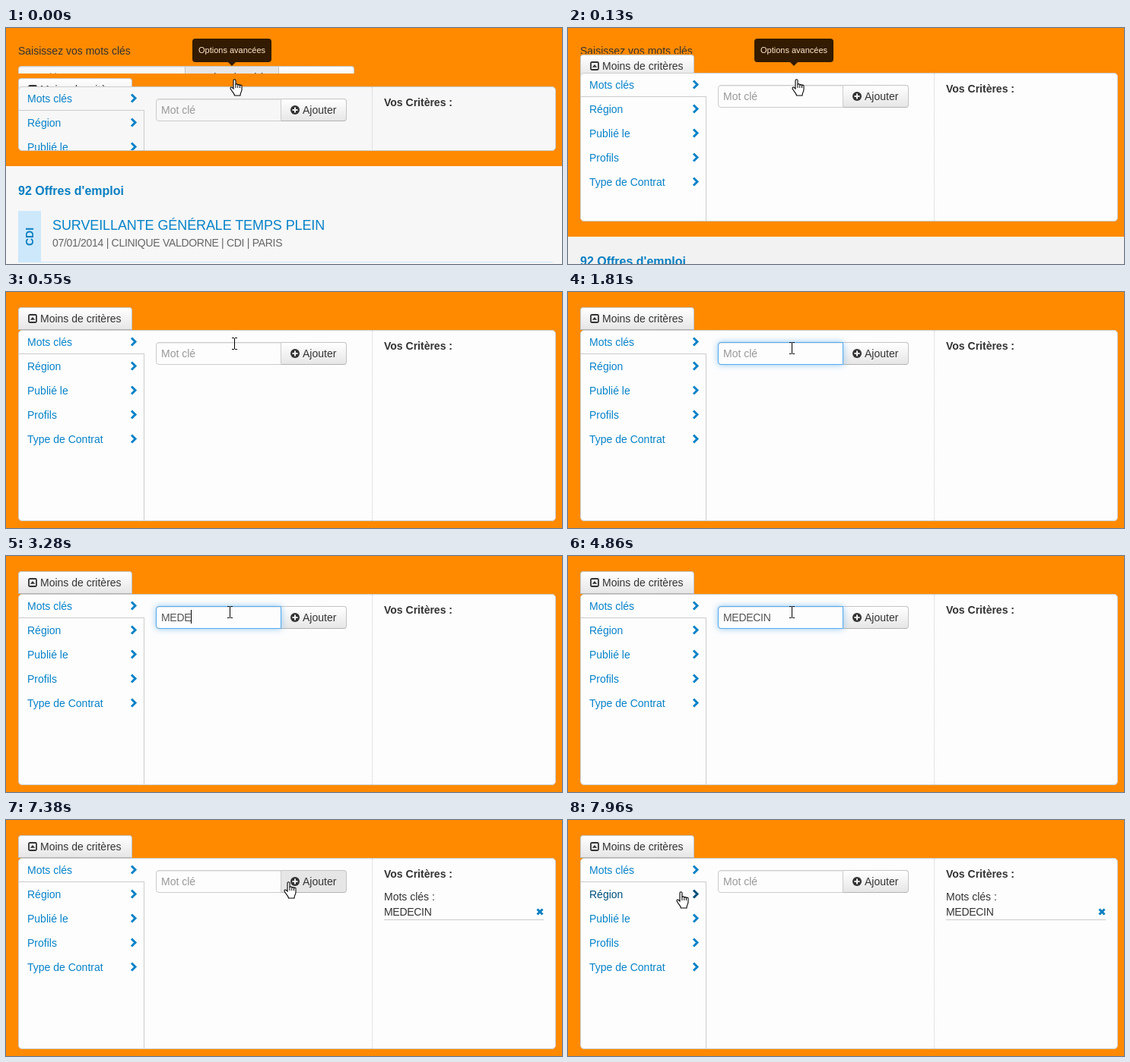
Animation, 731 px wide and 311 px high, one loop 8 s. Source, as an HTML page:

```html
<!DOCTYPE html>
<html lang="fr">
<head>
<meta charset="utf-8">
<title>Recherche d'offres</title>
<style>
  html, body { margin: 0; width: 100%; height: 100%; overflow: hidden; }
  body { position: relative; background: #ff8a00; color: #333; white-space: nowrap;
    font: 14px/20px "Liberation Sans", Arial, sans-serif; }
  body *, body *::before { box-sizing: border-box; }
  body div, #cursor { position: absolute; }
  svg { overflow: visible; }
  .icon { width: 12px; height: 12px; fill: currentColor; vertical-align: -1px; margin-right: 4px; }
  .caps { letter-spacing: -.3px; }
  .btn { height: 30px; padding: 4px 12px; border: 1px solid #c4c4c4; border-bottom-color: #b3b3b3;
    background: linear-gradient(#fff, #e6e6e6); }
  .btn.hover { background: #e6e6e6; }
  .btn.pressed { background: #e0e0e0; box-shadow: inset 0 2px 4px #0002; }
  .input { height: 30px; padding: 4px 6px; border: 1px solid #ccc; border-radius: 4px 0 0 4px;
    background: var(--paper); color: #999; box-shadow: inset 0 1px 1px #00000013; }

  #search { left: 0; top: 0; width: 731px; overflow: hidden; }
  #less { left: 16px; width: 150px; border-radius: 4px 4px 0 0; }
  #panel { left: 16px; width: 707px; overflow: hidden; border: 1px solid #ccc; border-radius: 5px;
    background: var(--paper); }
  #nav div { left: 11px; width: 145px; color: #0782c8; }
  #nav div.hover { color: #00507c; }
  #nav svg { position: absolute; right: 0; top: 3px; width: 10px; height: 13px; fill: none;
    stroke: currentColor; stroke-width: 3; }
  #tab { left: 0; top: 30px; width: 165px; height: 1px; background: #ccc; }
  #side { left: 164px; top: 31px; width: 1px; height: 230px; background: #ccc; }
  #dots { left: 464px; top: 0; height: 252px; border-left: 1px dotted #ccc; }
  #field { left: 180px; top: 15px; width: 165px; }
  #field.typed { color: #555; }
  #glow { left: 180px; top: 15px; width: 165px; height: 30px; border: 1px solid #52a8ec;
    border-radius: 4px 0 0 4px; box-shadow: 0 0 8px #52a8ec99; }
  #caret { display: inline-block; width: 1px; height: 18px; margin-right: -1px; vertical-align: top;
    background: #000; }
  #add { left: 344px; top: 15px; width: 87px; border-radius: 0 4px 4px 0; }
  #criterion { left: 480px; top: 40px; width: 210px; height: 41px; border-bottom: 1px solid #ccc; }
  #criterion svg { position: absolute; right: 0; top: 25px; width: 10px; height: 10px;
    stroke: #0a7fc1; stroke-width: 3; }
  #page { left: 0; width: 731px; height: 311px; background: var(--page); }
  #badge { left: 16px; top: 59px; width: 30px; height: 67px; background: #cde8fb; color: #0a7fc1;
    font-weight: bold; writing-mode: vertical-rl; transform: rotate(180deg); text-align: center; line-height: 30px; }
  #tip { left: 245px; top: 14px; width: 104px; height: 31px; border-radius: 4px; background: #000;
    color: #fff; font-size: 11px; line-height: 31px; text-align: center; }
  #tip::before { content: ""; position: absolute; left: 47px; top: 31px; border: 5px solid transparent;
    border-top-color: #000; border-bottom: 0; }
  #cursor { width: 17px; height: 23px; left: 0; top: 0; }
</style>
</head>
<body>
<svg width="0" height="0" style="position:absolute">
  <symbol id="square" viewBox="0 0 12 12">
    <rect x="1" y="1" width="10" height="10" rx="1.5" fill="none" stroke="currentColor" stroke-width="1.8"/>
    <path d="M2.8 7.8 6 4l3.2 3.8z"/>
  </symbol>
  <symbol id="plus" viewBox="0 0 12 12">
    <circle cx="6" cy="6" r="6"/><path d="M6 2.5v7M2.5 6h7" stroke="#f3f3f3" stroke-width="2"/>
  </symbol>
  <symbol id="chevron" viewBox="0 0 10 13"><path d="M2 1.5 7 6.5 2 11.5"/></symbol>
  <symbol id="hand" overflow="visible">
    <path fill="#fff" stroke="#000" stroke-width="1.1" d="M5 13V2.2a1.5 1.5 0 0 1 3 0V8a1.4 1.4 0 0 1 2.8.5 1.4 1.4 0 0 1 2.7.6 1.3 1.3 0 0 1 2.5.8V14c0 3-2 4-2 8H6.5c0-3-3.5-5-5.3-9-.8-2 1.5-2.8 2.6-1z"/>
    <path fill="none" stroke="#000" d="M8 7.5V12M10.8 8.5V12M13.5 9V12"/>
  </symbol>
  <symbol id="beam" overflow="visible">
    <path fill="none" stroke="#000" d="M0 .5h3m1 0h3M3.5 1v14M0 15.5h3m1 0h3"/>
  </symbol>
</svg>

<div id="page">
  <div style="left:16px;top:23px;font-weight:bold;font-size:16px;color:#0a7fc1">92 Offres d'emploi</div>
  <div style="left:16px;top:126px;width:703px;height:1px;background:#cde6f8"></div>
  <div id="badge">CDI</div>
  <div style="left:61px;top:68px;font-size:18px;color:#0782c8;letter-spacing:-.1px">SURVEILLANTE GÉNÉRALE TEMPS PLEIN</div>
  <div class="caps" style="left:61px;top:91px;color:#666">07/01/2014 | CLINIQUE VALDORNE | CDI | PARIS</div>
</div>

<div id="search">
  <div style="left:16px;top:20px">Saisissez vos mots clés</div>
  <div class="input" style="left:16px;top:50px;width:220px">Mot clé</div>
  <div class="btn hover" style="left:235px;top:50px;width:124px"><svg class="icon"></svg>Plus de critères</div>
  <div class="btn" style="left:358px;top:50px;width:100px;border-radius:0 4px 4px 0"></div>
</div>

<div id="less" class="btn"><svg class="icon"><use href="#square"/></svg>Moins de critères</div>

<div id="panel">
  <div id="nav"></div>
  <div id="tab"></div><div id="side"></div><div id="dots"></div>
  <div id="add" class="btn"><svg class="icon"><use href="#plus"/></svg>Ajouter</div>
  <div id="field" class="input"><span id="caret"></span><span id="hint">Mot clé</span></div>
  <div id="glow"></div>
  <div style="left:480px;top:10px;font-weight:bold">Vos Critères :</div>
  <div id="criterion">Mots clés :<br><span class="caps">MEDECIN</span>
    <svg><path d="M1.5 1.5l7 7m0-7l-7 7"/></svg></div>
</div>

<div id="tip">Options avancées</div>
<svg id="cursor"><use id="shape"/></svg>

<script>
const LOOP = 8000;
const WORD = "MEDECIN";
const el = id => document.getElementById(id);

el("nav").innerHTML = ["Mots clés", "Région", "Publié le", "Profils", "Type de Contrat"]
  .map((name, i) => `<div style="top:${5 + 32 * i}px">${name}<svg><use href="#chevron"/></svg></div>`).join("");

const hand = (x, y) => ({ cursor: ["hand", x, y] });
const beam = (x, y) => ({ cursor: ["beam", x, y] });
const type = typed => ({ typed, caret: 1 });

// Each step holds until the next one and changes only the listed values.
const steps = [
  [0, { clip: 60, less: 66, top: 77, height: 85, paper: "#f7f7f7", page: "#f7f7f7", tip: .8,
        glow: 0, caret: 0, typed: 0, add: "", added: 0, region: 0, ...hand(294, 67) }],
  [130, { clip: 34, less: 35, top: 59, height: 196, paper: "#fdfdfd", page: "#f2f2f2" }],
  [280, { clip: 0, less: 20, top: 50, height: 247 }],
  [420, { height: 252, tip: .4, ...beam(297, 60) }],
  [550, { tip: 0 }],
  [820, beam(291, 66)],
  [1100, { glow: .5, caret: 1 }],
  [1220, { glow: 1 }],
  [1810, { caret: 0 }],
  [2360, { caret: 1 }],
  [2480, type(1)],
  [2730, type(2)],
  [2850, type(3)],
  [3280, type(4)],
  [3590, type(5)],
  [4020, type(6)],
  [4270, type(7)],
  [4860, { caret: 0 }],
  [5300, { caret: 1 }],
  [5720, beam(335, 66)],
  [5880, { caret: 0, ...hand(368, 74) }],
  [6020, hand(372, 74)],
  [6170, { glow: .4, add: "hover", ...hand(368, 80) }],
  [6290, { glow: 0, add: "pressed" }],
  [6660, { typed: 0, add: "hover", added: 1 }],
  [7380, hand(365, 81)],
  [7530, hand(358, 75)],
  [7680, { add: "", ...beam(262, 78) }],
  [7810, { region: 1, ...hand(150, 89) }],
  [7960, hand(142, 94)],
];

function render(s) {
  const px = (id, prop, value) => el(id).style[prop] = value + "px";
  const root = document.body.style;
  root.setProperty("--paper", s.paper);
  root.setProperty("--page", s.page);
  px("search", "height", s.clip);
  px("less", "top", s.less);
  px("panel", "top", s.top);
  px("panel", "height", s.height);
  px("page", "top", s.top + s.height + 20);
  el("tip").style.opacity = s.tip;
  el("glow").style.opacity = s.glow;
  el("criterion").style.opacity = s.added;
  el("add").className = "btn " + s.add;
  el("nav").children[1].className = s.region ? "hover" : "";

  const caret = el("caret"), hint = el("hint"), field = el("field");
  caret.style.opacity = s.caret;
  caret.style.height = s.typed ? "18px" : "20px";
  hint.textContent = s.typed ? WORD.slice(0, s.typed) : "Mot clé";
  hint.className = s.typed ? "caps" : "";
  field.className = s.typed ? "input typed" : "input";
  field.append(...(s.typed ? [hint, caret] : [caret, hint]));

  const [shape, x, y] = s.cursor;
  el("shape").setAttribute("href", "#" + shape);
  el("cursor").style.transform = `translate(${x}px, ${y}px)`;
}

let shown = 0;
function frame() {
  const t = performance.now() % LOOP;
  const past = steps.filter(([at]) => at <= t);
  if (past.length !== shown) {
    shown = past.length;
    render(Object.assign({}, ...past.map(([, change]) => change)));
  }
  requestAnimationFrame(frame);
}
frame();
</script>
</body>
</html>
```
